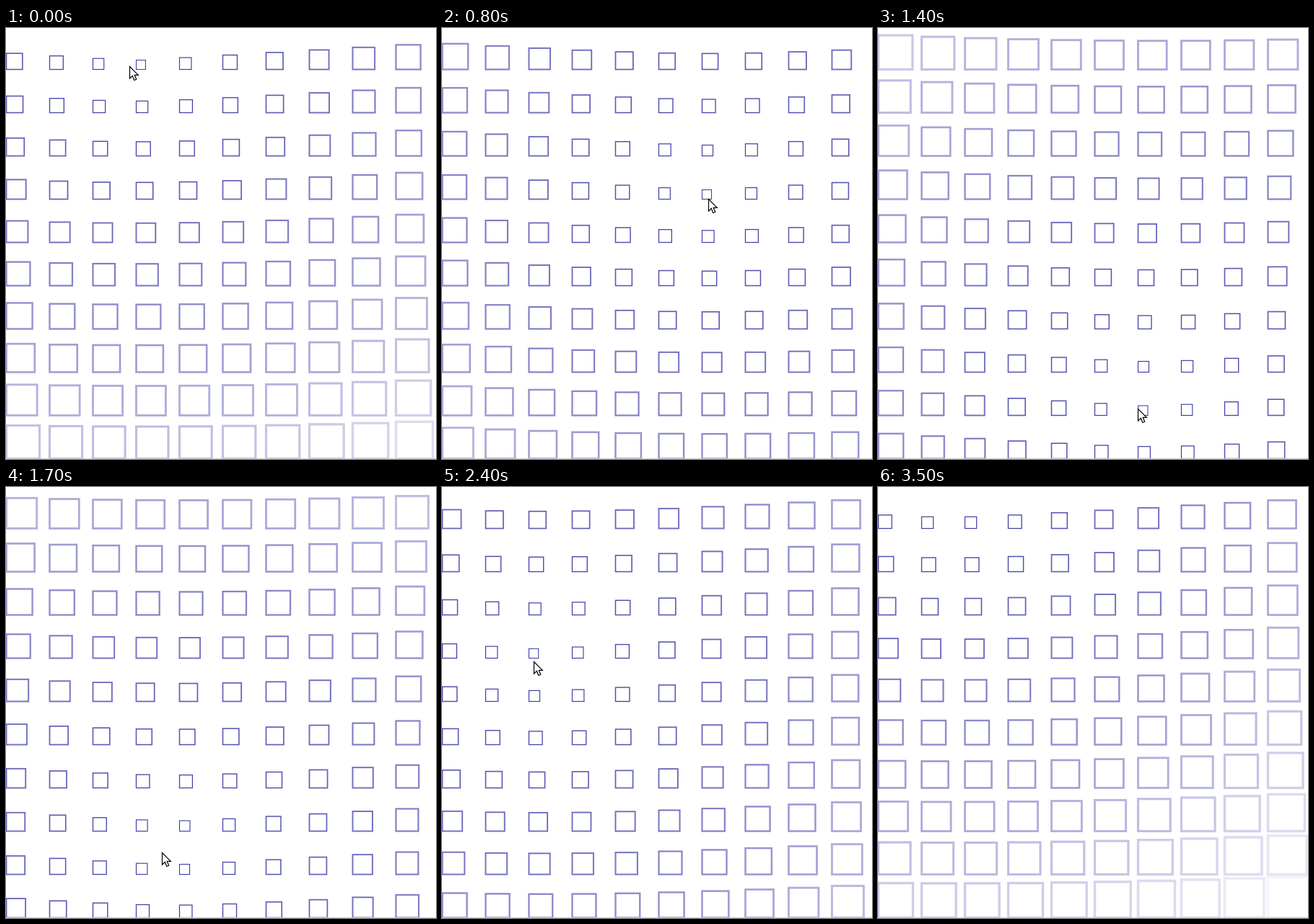
These frames come from a looping animation (596x598 px, 3700 ms). An HTML page with a canvas:

```html
<!DOCTYPE html>
<html lang="en">
<head>
<meta charset="utf-8">
<title>Squares around the pointer</title>
<style>
  html, body { margin: 0; width: 100%; height: 100%; overflow: hidden; background: #fff; }
  canvas { display: block; }
</style>
</head>
<body>
<canvas id="stage" width="596" height="598"></canvas>
<script>
const ctx = document.getElementById('stage').getContext('2d');
const LOOP = 3700;
const EXIT = 3500;
const CELL = 60;
const COUNT = 10;
const FADE = 790;
const LEAD = 30; // the arrow runs this many ms ahead of the squares

const path = [
  { t: 0, x: 170, y: 53 },
  { t: 500, x: 266, y: 117 },
  { t: 1100, x: 434, y: 358 },
  { t: 1400, x: 372, y: 522 },
  { t: 1700, x: 225, y: 512 },
  { t: 2100, x: 150, y: 404 },
  { t: 2400, x: 128, y: 252 },
  { t: 3000, x: 119, y: 95 },
  { t: EXIT, x: 90, y: 0 }
];

// The picture advances in steps of 100 ms, with a few longer rests.
function stepTime(t) {
  if (t < 200) return 0;
  if (t >= EXIT) return EXIT;
  if (t >= 2400 && t < 3000) return 2400;
  return Math.min(Math.floor(t / 100) * 100, 3300);
}

function slope(i, axis) {
  const a = path[i - 1], b = path[i + 1];
  return a && b ? (b[axis] - a[axis]) / (b.t - a.t) : 0;
}

// Smooth cubic curve through the path points.
function along(t, axis) {
  let i = 0;
  while (i < path.length - 2 && t >= path[i + 1].t) i++;
  const a = path[i], b = path[i + 1];
  const span = b.t - a.t;
  const u = (t - a.t) / span, v = 1 - u;
  return v * v * (1 + 2 * u) * a[axis] + u * u * (1 + 2 * v) * b[axis]
    + u * v * span * (v * slope(i, axis) - u * slope(i + 1, axis));
}

function pointAt(t) {
  return { x: along(t, 'x'), y: along(t, 'y') };
}

function drawSquare(left, bottom, distance) {
  const size = 12.3 + 0.059 * distance;
  const alpha = Math.max(0.04, 1 - distance / FADE);
  ctx.lineWidth = 0.9 + 0.004 * distance;
  ctx.strokeStyle = `rgba(42, 42, 160, ${alpha})`;
  ctx.strokeRect(left + 0.5, bottom - 0.5 - size, size, size);
}

const arrow = new Path2D('M.5 .5V17L4.3 13.4L6.8 19.5L9.7 18.3L7.2 12.3H12.3Z');

function drawArrow({ x, y }) {
  ctx.save();
  ctx.translate(Math.round(x), Math.round(y));
  ctx.lineWidth = 1.2;
  ctx.fillStyle = '#fff';
  ctx.strokeStyle = '#000';
  ctx.fill(arrow);
  ctx.stroke(arrow);
  ctx.restore();
}

function draw(t) {
  const focus = pointAt(t);
  ctx.fillStyle = '#fff';
  ctx.fillRect(0, 0, 596, 598);
  for (let row = 0; row < COUNT; row++) {
    for (let col = 0; col < COUNT; col++) {
      const left = col * CELL, bottom = 58 + row * CELL;
      drawSquare(left, bottom, Math.hypot(left - focus.x, bottom - focus.y));
    }
  }
  ctx.fillStyle = '#d0d0d0';
  ctx.fillRect(0, 597, 596, 1);
  if (t < EXIT) drawArrow(pointAt(t + LEAD));
}

const start = performance.now();
function tick() {
  draw(stepTime((performance.now() - start) % LOOP));
  requestAnimationFrame(tick);
}
tick();
</script>
</body>
</html>
```
